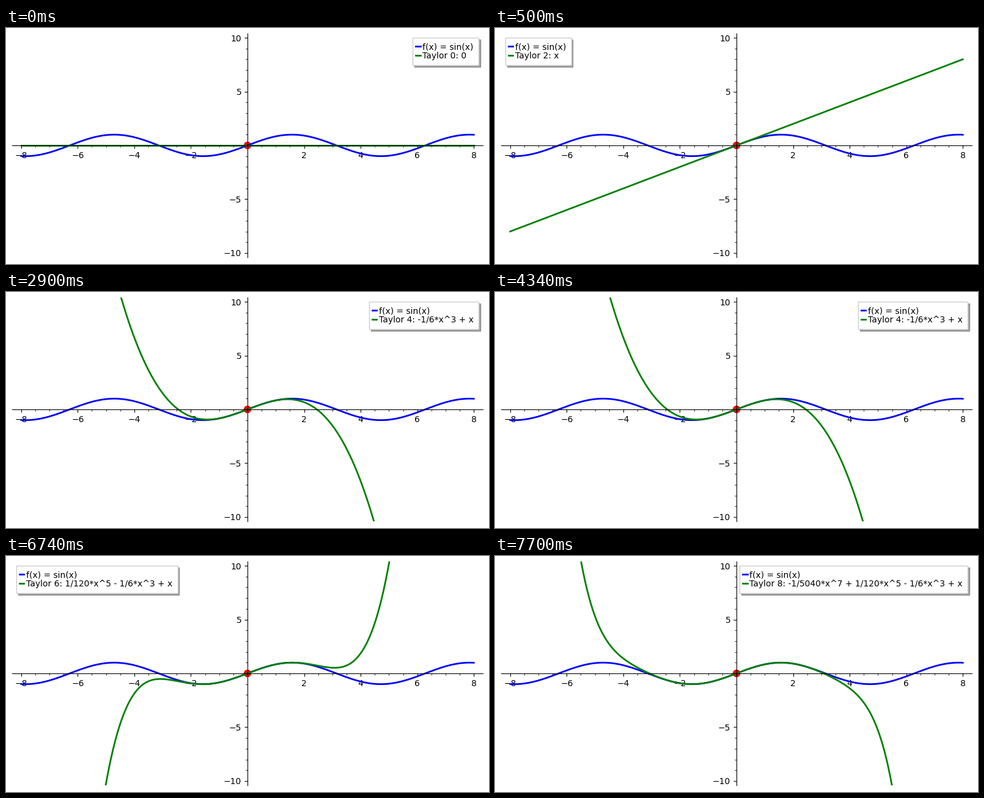
A matplotlib script that plays this animation: 790x388 px, repeating every 8000 ms.

```python
from math import factorial

import matplotlib.pyplot as plt
import numpy as np
from matplotlib.animation import FuncAnimation
from matplotlib.ticker import AutoMinorLocator, FuncFormatter, MultipleLocator

W, H, DPI = 790, 388, 100
STEP = 100  # ms per frame
LOOP = 8000
FIRST, HOLD = 500, 2400  # ms the first order stays, then each later one

plt.rcParams["font.family"] = "DejaVu Sans"
plt.rcParams["font.size"] = 10

x = np.linspace(-8, 8, 1001)


def powers(order):
    """Odd powers below the order, highest first."""
    return [k for k in range(order, 0, -1) if k % 2]


def sign(k):
    return -1 if k % 4 == 3 else 1


def taylor(order):
    return sum((sign(k) * x**k / factorial(k) for k in powers(order)), np.zeros_like(x))


def taylor_text(order):
    text = ""
    for k in powers(order):
        term = "x" if k == 1 else f"1/{factorial(k)}*x^{k}"
        if text:
            text += " - " if sign(k) < 0 else " + "
        elif sign(k) < 0:
            text = "-"
        text += term
    return text or "0"


def tick_text(value, _):
    return f"{value:.0f}".replace("-", "\u2212") if abs(value) > 0.1 else ""


fig = plt.figure(figsize=(W / DPI, H / DPI), dpi=DPI, facecolor="white")
ax = fig.add_axes([10 / W, 11 / H, 770 / W, 368 / H])
ax.set_xlim(-8.32, 8.32)
ax.set_ylim(-10.4, 10.4)

for side in ("top", "right"):
    ax.spines[side].set_visible(False)
for side in ("bottom", "left"):
    ax.spines[side].set_position("zero")
for axis, gap in ((ax.xaxis, 2), (ax.yaxis, 5)):
    axis.set_major_locator(MultipleLocator(gap))
    axis.set_minor_locator(AutoMinorLocator())
    axis.set_major_formatter(FuncFormatter(tick_text))

ax.scatter([0], [0], s=80, color="red", edgecolors="none", zorder=1)
sine, = ax.plot(x, np.sin(x), color="blue", lw=2)
approx, = ax.plot(x, taylor(0), color="green", lw=2)


def draw(frame):
    t = frame * STEP
    stage = 0 if t < FIRST else 1 + (t - FIRST) // HOLD
    order = 2 * stage
    approx.set_ydata(taylor(order))
    # The legend sits in the corner the curve leaves free.
    ax.legend(
        [sine, approx],
        ["f(x) = sin(x)", f"Taylor {order}: {taylor_text(order)}"],
        loc="upper left" if stage % 2 else "upper right",
        fancybox=False, shadow=True, framealpha=1, facecolor="white",
        borderpad=0.6, handlelength=0.05, handletextpad=0.5,
        labelspacing=0.02, numpoints=2, markerscale=0.6,
    )
    return []


anim = FuncAnimation(fig, draw, frames=LOOP // STEP, interval=STEP,
                     repeat=True, repeat_delay=0, blit=False)
plt.show()
```
